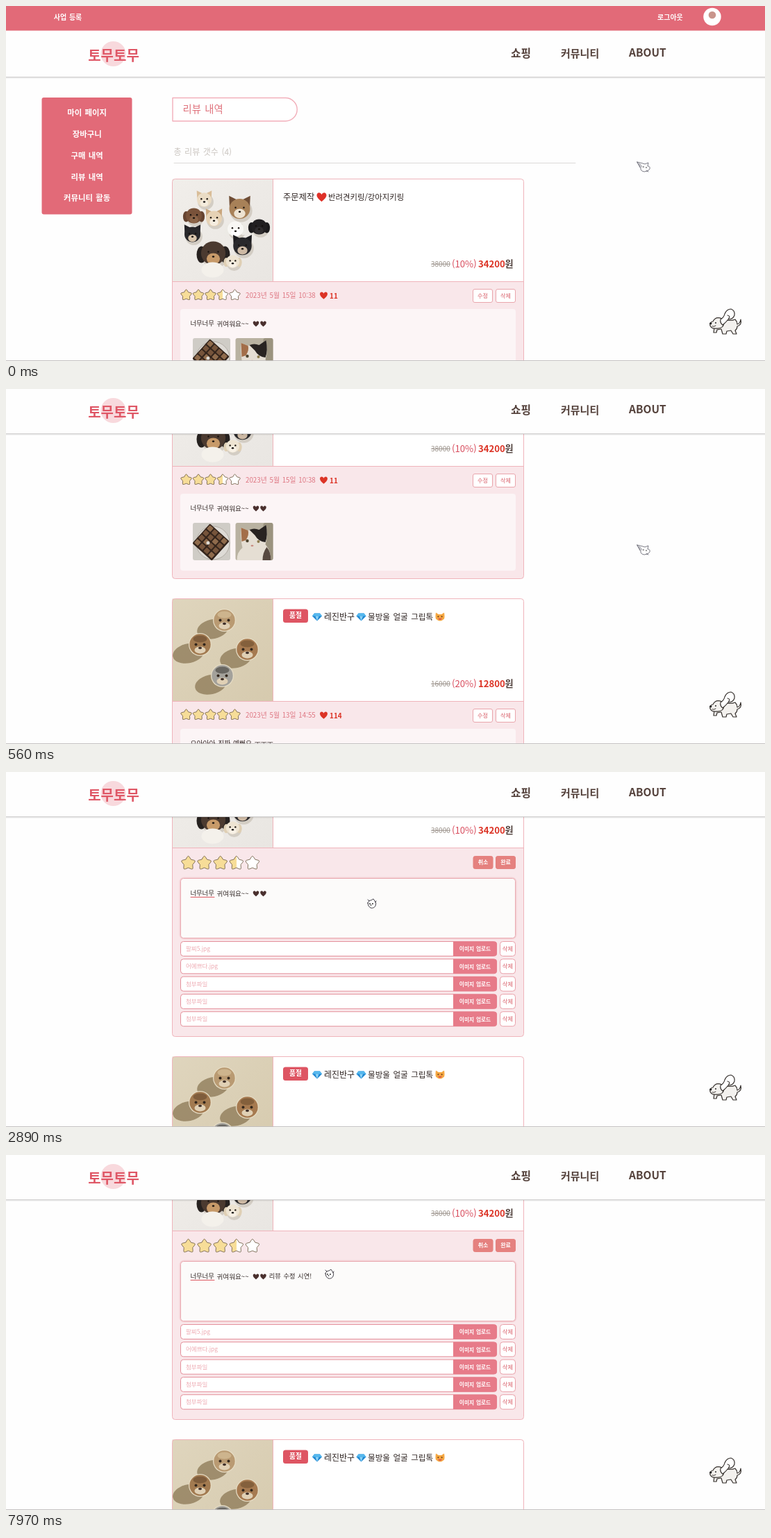
Animation, 1093 px wide and 512 px high, one loop 8000 ms. Source, as an HTML page:

```html
<!DOCTYPE html>
<html lang="ko">
<head>
<meta charset="utf-8">
<style>
  html, body { margin: 0; width: 100%; height: 100%; overflow: hidden; background: #fefefe; }
  svg { display: block; }
  text { font-family: 'Noto Sans CJK KR', 'Noto Sans CJK JP', 'Noto Sans CJK', sans-serif; white-space: pre; word-spacing: .1em; }
</style>
</head>
<body>
<svg id="stage" width="1093" height="512" viewBox="0 0 1093 512"></svg>
<script>
const LOOP = 8000, SCROLL = 288, EDIT_AT = 1630, EDIT_GROWTH = 110;
const ROSE = '#e26a78', LINE = '#efb4bb', INK = '#302624';

// Shape helpers
const label = (x, y, str, size, fill, weight = 400, extra = '') =>
  `<text x="${x}" y="${y + size * .37}" font-size="${size}" fill="${fill}" font-weight="${weight}" ${extra}>${str}</text>`;
const centered = (x, y, str, size, fill, weight) => label(x, y, str, size, fill, weight, 'text-anchor="middle"');
const box = (x, y, w, h, r, fill, stroke = 'none', extra = '') =>
  `<rect x="${x}" y="${y}" width="${w}" height="${h}" rx="${r}" fill="${fill}" stroke="${stroke}" ${extra}/>`;
const disc = (x, y, r, fill, ry = r) => `<ellipse cx="${x}" cy="${y}" rx="${r}" ry="${ry}" fill="${fill}"/>`;
const path = (d, fill, stroke = 'none', width = 1) =>
  `<path d="${d}" fill="${fill}" stroke="${stroke}" stroke-width="${width}" stroke-linejoin="round" stroke-linecap="round"/>`;
const group = (x, y, content, extra = '') => `<g transform="translate(${x} ${y})" ${extra}>${content}</g>`;
const button = (x, y, w, h, str, size, fill, stroke, ink, weight = 400) =>
  box(x, y, w, h, 2.5, fill, stroke) + centered(x + w / 2, y + h / 2, str, size, ink, weight);

const heart = (x, y, s, fill) => group(x, y,
  `<path transform="scale(${s / 2})" d="M0 .95C-.5.55-1 .1-1-.35-1-1-.25-1.1 0-.5.25-1.1 1-1 1-.35 1 .1.5.55 0 .95Z" fill="${fill}"/>`);

// Star with rounded tips
function star(x, y, r, amount) {
  const polar = (step, d) => [x + d * Math.sin(step * Math.PI / 5), y - d * Math.cos(step * Math.PI / 5)];
  const between = (a, b, p) => a.map((v, i) => v + (b[i] - v) * p);
  const arms = [0, 2, 4, 6, 8].map(i => {
    const left = polar(i - 1, r * .63), tip = polar(i, r * 1.1), right = polar(i + 1, r * .63);
    return `${between(left, tip, .6)}Q${tip} ${between(tip, right, .4)}L${right}`;
  });
  const fill = amount >= 1 ? '#f7dd98' : amount > 0 ? 'url(#half)' : '#fff';
  return path(`M${arms.join('L')}Z`, fill, '#77664e', .9);
}
const stars = (x, y, r, gap, score) => [0, 1, 2, 3, 4].map(i => star(x + i * gap, y, r, score - i)).join('');

const gem = (x, y) => group(x, y,
  path('M-7-1L-4-5H4L7-1L0 6Z', '#1f87d2') + path('M-7-1H7L4-5H-4Z', '#55b8ee') + path('M-2.5-1H2.5L0 6Z', '#8ad2f6'));
const catFace = (x, y) => group(x, y,
  path('M-6-6L-2-3.5H2L6-6Q7 0 6 3Q3 6 0 6T-6 3Q-7 0-6-6Z', '#f5a742') +
  disc(-2.6, -.3, 1, '#6b3c14') + disc(2.6, -.3, 1, '#6b3c14') + path('M-3 2.3H3Q1.5 4.5 0 4.5T-3 2.3Z', '#d9534f'));

// Pictures as flat shapes
function feltHead([x, y, r, coat, muzzle, ears, floppy]) {
  const earShapes = floppy
    ? disc(-r * .85, r * .1, r * .35, ears, r * .6) + disc(r * .85, r * .1, r * .35, ears, r * .6)
    : path(`M${-r * .9} ${-r * 1.1}L${-r * .1} ${-r * .7}L${-r * .85} 0ZM${r * .9} ${-r * 1.1}L${r * .1} ${-r * .7}L${r * .85} 0Z`, ears);
  return group(x, y, disc(2, 3, r * .95, '#d3cdc4') + earShapes +
    disc(0, 0, r * .88, coat, r * .85) + disc(0, r * .4, r * .48, muzzle, r * .4) +
    disc(-r * .35, -r * .1, 1.2, '#17120f') + disc(r * .35, -r * .1, 1.2, '#17120f') + disc(0, r * .25, 1.7, '#17120f', 1.3));
}
const keyringPhoto = box(0, 0, 145, 148, 0, 'url(#paper)') + [
  [46, 30, 12, '#eadcc5', '#f4ecdd', '#d9bd98'], [97, 43, 17, '#a88158', '#eee3d2', '#6f4d35'],
  [31, 53, 13, '#79523a', '#8c6549', '#654330', true], [60, 57, 13, '#e6d2b5', '#f5ecdf', '#c9a67d'],
  [125, 69, 13, '#211f21', '#302d2f', '#1b1a1c', true], [91, 72, 13, '#f8f7f4', '#fff', '#eceae5', true],
  [29, 80, 13, '#29282b', '#d8c5ad', '#242327'], [101, 97, 15, '#29282b', '#cdb9a4', '#1d1c1f'],
  [59, 107, 20, '#4b3a30', '#c79a69', '#26211f', true], [87, 119, 11, '#eee4d2', '#f8f1e6', '#dfcfb4', true]
].map(feltHead).join('') + disc(58, 131, 16, '#f4f1eb', 11);

function gripToy([x, y, coat, shade]) {
  return group(x, y,
    `<ellipse cx="-19" cy="9" rx="23" ry="14" transform="rotate(-12)" fill="#8b7754" opacity=".75"/>` +
    disc(0, 0, 16.5, '#e6dcc4') + disc(0, 0, 15.2, coat) + disc(0, 8, 8, '#e0d0b5', 5) + disc(0, -8, 10, shade, 5) +
    disc(-6, 0, 2, '#33271d') + disc(6, 0, 2, '#33271d') + disc(0, 5, 2.5, '#40302a', 1.8));
}
const gripPhoto = box(0, 0, 145, 148, 0, 'url(#sand)') + `<g clip-path="url(#photoClip)">` + [
  [75, 31, '#b99a72', '#cdb48d'], [40, 66, '#a27a50', '#7f5d3c'],
  [108, 73, '#a67a50', '#84603c'], [72, 111, '#a3a19b', '#686661']
].map(gripToy).join('') + '</g>';

const chocolateCells = Array.from({ length: 16 }, (_, i) =>
  box(i % 4 * 9 - 17.5, (i >> 2) * 9 - 17.5, 7, 7, 1, i % 3 ? '#76543b' : '#8f6b4c')).join('');
const chocolateThumb = box(0, 0, 54, 54, 3, '#cfccc6') +
  `<circle cx="29" cy="29" r="24" fill="#dedbd6" stroke="#a9a39b" stroke-width=".8"/>` +
  `<g transform="translate(26 28) rotate(42)">${box(-19, -19, 38, 38, 2, '#35251c')}${chocolateCells}</g>` + disc(22, 29, 2.5, '#dedbd5');
const catThumb = box(0, 0, 54, 54, 3, '#b9b2a1') + box(40, 0, 14, 54, 3, '#9b937f') +
  path('M2 54Q2 42 10 36Q7 24 8 7L18 11Q26 7 34 10L44 3Q47 20 43 31Q51 40 51 54Z', '#e5ded3') +
  path('M8 7L18 11Q20 17 15 25L9 27Z', '#a36e49') + path('M20 10Q27 7 34 10L44 3Q47 18 43 28Q33 27 28 18Z', '#282321') +
  path('M39 54Q39 43 45 35Q51 42 51 54Z', '#574940') +
  disc(17, 26, 2.2, '#4e4530') + disc(33, 27, 2, '#8c7b4b') + disc(24, 33, 2, '#c98f84', 1.3);

// Review card, in coordinates relative to its corner
const filledButton = (x, str, fill = '#e5817f') => button(x, 160, 28, 18, str, 8, fill, fill, '#fff', 700);
const outlinedButton = (x, str) => button(x, 159, 28, 19, str, 8.2, '#fff', '#e9a5ac', '#d9626c');

function viewPanel({ score, date, likes, review, thumbs = '' }) {
  return stars(20, 167.5, 8.3, 17.5, score) + label(105.5, 168, date, 9.8, '#de7580') +
    heart(218, 168, 11, '#dc3426') + label(226.5, 168.5, likes, 10, '#dc3426', 700) +
    outlinedButton(433, '수정') + outlinedButton(466, '삭제') +
    box(11.5, 187.5, 483, 111, 4, '#fcf5f6') + review + thumbs;
}
const cardFrame = ({ photo, title, was, off, price }) =>
  box(0, 0, 506, 146, 4, '#fff') + box(0, 6, 506, 142, 0, '#fff') + photo + title +
  label(372.5, 123, was, 10, '#999088', 400, 'text-decoration="line-through"') +
  label(402.5, 123, off, 13.2, '#d84b5c') + label(440.5, 123, price, 13.2, '#dc3426', 700) +
  label(479, 123, '원', 13.2, '#50403c', 700) + path('M145 0V148M0 148H506', 'none', LINE);

const reviewText = y => label(26, y, '너무너무', 9.3, INK) + label(64, y, '귀여워요~~', 9.6, INK) +
  heart(120.5, y + .3, 8.6, '#4a302e') + heart(131, y + .3, 8.6, '#4a302e');

const files = ['팔찌5.jpg', '어예쁘다.jpg', '첨부파일', '첨부파일', '첨부파일'];
const fileRow = (name, i) => group(0, 283 + i * 25.3,
  box(12, 0, 455, 21, 4, '#fff', '#e4909b') + label(19.5, 10.5, name, 8.5, '#eeabb3') +
  path('M404.5 0H463.5Q467.5 0 467.5 4V17Q467.5 21 463.5 21H404.5Z', '#e77b89') +
  centered(436, 11, '이미지 업로드', 7.7, '#fff', 700) +
  box(472, 0, 22, 21, 4, '#fff', '#e9a0a9') + centered(483, 10.5, '삭제', 8.4, '#d9626c'));

const editPanel = stars(23, 170, 10.5, 23.1, 3.5) + filledButton(433.5, '취소') + filledButton(466, '완료') +
  `<g class="hover">${filledButton(433.5, '취소', '#df686f')}</g>` +
  `<g id="focus">${box(12, 192, 482, 86, 5, 'none', '#eeb3ba', 'stroke-width="4" opacity=".4"')}</g>` +
  box(12, 192, 482, 86, 4, '#fcfbfa', '#e9a9b0') + reviewText(213.5) +
  `<g id="spelling">${path('M26.5 219H60.5', 'none', '#dd5a62', 1)}</g>` +
  label(139.3, 213.5, '', 9.3, INK, 400, 'id="typed"') + box(0, 206.5, 1, 14, 0, '#333', 'none', 'id="caret"') +
  files.map(fileRow).join('');

const cardShell = (id, content) =>
  box(0, 0, 506, 310, 4, '#f9e7ea', 'none', `id="${id}Back"`) + content +
  box(0, 0, 506, 310, 4, 'none', LINE, `id="${id}Edge"`);

const firstCard = cardShell('first', cardFrame({
  photo: keyringPhoto, was: '38000', off: '(10%)', price: '34200',
  title: label(159.5, 26, '주문제작', 12.3, INK) + heart(215, 26, 14, '#df3128') + label(224.5, 26, '반려견키링/강아지키링', 11.4, INK)
}) + `<g id="view">${viewPanel({
  score: 3.5, date: '2023년 5월 15일 10:38', likes: '11', review: reviewText(208.5),
  thumbs: group(29.5, 229.5, chocolateThumb) + group(91, 229.5, catThumb)
})}<g class="hover">${filledButton(433.5, '수정', '#df686f')}</g></g><g id="edit">${editPanel}</g>`);

const secondCard = cardShell('second', cardFrame({
  photo: gripPhoto, was: '16000', off: '(20%)', price: '12800',
  title: box(159.5, 15, 36, 19.5, 3.5, '#de5563') + centered(177.5, 24, '품절', 9.8, '#fff', 700) +
    gem(208.5, 26) + label(218.5, 26, '레진반구', 12, INK) + gem(272, 26) +
    label(281.5, 26, '물방울 얼굴 그립톡', 11.6, INK) + catFace(385.5, 26)
}) + viewPanel({
  score: 5, date: '2023년 5월 13일 14:55', likes: '114',
  review: label(26, 208.5, '으아아아 진짜 예뻐요 ㅜㅜㅜ', 9.8, INK)
}));

const menu = ['마이 페이지', '장바구니', '구매 내역', '리뷰 내역', '커뮤니티 활동'];
const page = box(51.5, 132, 130, 168.5, 3, ROSE) +
  menu.map((item, i) => centered(116.7, 154 + i * 30.8, item, 11.4, '#fff', 700)).join('') +
  path('M240 132.5H402.5A16.7 16.7 0 0 1 402.5 166H240Z', '#fff', '#f2afba', 1.4) +
  label(254.5, 149, '리뷰 내역', 14.3, '#df717b') +
  label(241.5, 210.5, '총 리뷰 갯수 (4)', 12, '#cbc6c1') + path('M242 226.5H820', 'none', '#dcdad8') +
  group(239.5, 249.5, firstCard) + group(239.5, 588.5, secondCard, 'id="second"');

const header = box(0, 35, 1093, 69.5, 0, '#000', 'none', 'opacity=".08"') + box(0, 35, 1093, 67, 0, '#fefefe') +
  path('M0 102.5H1093', 'none', '#cfcdcd') + box(0, 0, 1093, 35.5, 0, ROSE) +
  label(68.7, 16, '사업 등록', 10, '#fff', 700) + label(938, 16, '로그아웃', 10, '#fff', 700) +
  disc(1017, 15.5, 12.7, '#fff') + disc(1017, 13, 5.3, '#c9958c') +
  disc(154.5, 69, 18, '#f8d9dd') + centered(155, 72, '토무토무', 20, '#df5766', 900) +
  label(727, 68.5, '쇼핑', 15.8, '#54413b', 700) + label(799, 68, '커뮤니티', 15, '#54413b', 700) +
  label(897, 67.5, 'ABOUT', 15.5, '#54413b', 700);

const walkingDog =
  path('M1032 452Q1044 455 1050 452Q1053 455 1053 459Q1057 458 1058 452Q1060 460 1053 462Q1053 466 1050 468L1052 473H1047L1044 468L1038 469L1037 473H1032L1030 466L1024 467L1023 471H1019L1020 464Z', '#f3f1ee', '#37322f', 1.2) +
  path('M1031 451Q1022 447 1018 455Q1013 456 1014 461Q1016 466 1023 465Q1033 466 1034 457Z', '#f3f1ee', '#37322f', 1.2) +
  path('M1029 452Q1034 449 1035 444Q1038 437 1044 437Q1050 439 1049 446Q1047 452 1040 452Q1036 457 1032 460Q1028 457 1029 452ZM1040 452Q1044 447 1039 446', '#fff', '#37322f', 1.2) +
  disc(1022, 457, 1, '#222') + disc(1014.8, 458, 1.7, '#222', 1.4) + path('M1017 462Q1020 463 1022 461', 'none', '#37322f');

const cursors = {
  arrow: path('M-9-7L-1-5L2-4L7-6L6-1Q10-1 9 3Q7 7 1 7Q-5 6-4 1Z', '#fff', '#5b5b68', .8) +
    path('M-9-7L-5 1M-6-5L-2 0M7 7L4 5', 'none', '#5b5b68', .8) + disc(0, 0, .8, '#222') + disc(4, 1, .8, '#222'),
  hand: path('M-2-6Q0-7 1-5V-1Q5-2 5 2Q5 7 1 7Q-3 7-4 3L-6 0Q-5-2-2 0Z', '#fff', '#55474a', .9) + path('M1 0V3M3 0V3', 'none', '#55474a', .7),
  face: path('M-6-1Q-5-5-1-5L2-7L4-4Q7-1 5 3Q3 7-2 6Q-6 4-6-1Z', '#fff', '#45424a', 1) +
    path('M-4-4L-6-6M5-2L6-4', 'none', '#45424a', 1) + disc(-3, 0, .9, '#222') + disc(1, 0, .9, '#222') + disc(-1.5, 2, 1, '#222', .7)
};

const stage = document.getElementById('stage');
stage.innerHTML = `<defs>
  <linearGradient id="half"><stop offset=".5" stop-color="#f7dd98"/><stop offset=".5" stop-color="#fff"/></linearGradient>
  <linearGradient id="paper" x2="1" y2="1"><stop stop-color="#f1eeea"/><stop offset="1" stop-color="#e9e6e2"/></linearGradient>
  <linearGradient id="sand" x2="1" y2="1"><stop stop-color="#dfd5bd"/><stop offset="1" stop-color="#d6caae"/></linearGradient>
  <clipPath id="photoClip"><rect width="145" height="148"/></clipPath></defs>
  <g id="page">${page}</g><g id="header">${header}</g>${walkingDog}
  ${path('M0 511.5H1093', 'none', '#c4c2c2')}
  <g id="cursor">${Object.entries(cursors).map(([kind, art]) => `<g id="${kind}">${art}</g>`).join('')}</g>`;

// [time, text after the hearts, caret visible]
const typing = [
  [0, '', false], [2360, '', true], [2890, '', false], [3090, '', true],
  [3420, 'ㄹ', true], [3550, '리', true], [3750, '립', true], [3820, '리뷰', true],
  [4040, '리뷰 ㅅ', true], [4300, '리뷰 수ㅈ', true], [4700, '리뷰 수', true], [4830, '리뷰 ', true], [5240, '리뷰 ', false],
  [5710, '리뷰 ㅅ', true], [5800, '리뷰 수', true], [5880, '리뷰 숮', true], [5970, '리뷰 수저', true],
  [6110, '리뷰 수정', true], [6220, '리뷰 수정 ', true], [6330, '리뷰 수정 ㅅ', true], [6440, '리뷰 수정 시', true],
  [6580, '리뷰 수정 싱', true], [6670, '리뷰 수정 시여', true], [6770, '리뷰 수정 시연', true],
  [7170, '리뷰 수정 시연!', true], [7700, '리뷰 수정 시연!', false]
];
// [start, end, x, y]
const moves = [[620, 1040, 662, 137], [1040, 1490, 687, 130], [1700, 2090, 527, 190], [7970, 7970, 466, 172]];

const $ = id => document.getElementById(id);
const show = (el, on) => { el.style.display = on ? '' : 'none'; };
const ease = (t, from, to) => {
  if (t >= to) return 1;
  const p = Math.max(0, (t - from) / (to - from));
  return p * p * (3 - 2 * p);
};

function render(t) {
  // Scroll and pointer advance in 70 ms ticks, as a screen capture does
  const tick = t < 270 ? 0 : t < 1490 ? 270 + Math.floor((t - 270) / 70) * 70 : t;
  const scroll = Math.floor(SCROLL * ease(tick, 180, 566));
  const editing = t >= EDIT_AT;
  const growth = editing ? EDIT_GROWTH : 0;

  $('page').setAttribute('transform', `translate(0 ${-scroll})`);
  $('header').setAttribute('transform', `translate(0 ${-Math.min(38, scroll)})`);
  $('second').setAttribute('transform', `translate(239.5 ${588.5 + growth})`);
  for (const id of ['firstBack', 'firstEdge']) $(id).setAttribute('height', 310 + growth);
  show($('view'), !editing);
  show($('edit'), editing);
  show($('focus'), t >= 2090);
  show($('spelling'), t >= 2360);

  const [, text, caretOn] = typing.findLast(([time]) => t >= time);
  if ($('typed').textContent !== text) $('typed').textContent = text;
  const caretX = t < 3090 ? 135.5 : 138.5 + (text ? $('typed').getComputedTextLength() : 0);
  $('caret').setAttribute('x', caretX);
  show($('caret'), caretOn);

  let x = 918, y = 232;
  for (const [from, to, toX, toY] of moves) {
    const p = ease(tick, from, to);
    x += (toX - x) * p;
    y += (toY - y) * p;
  }
  const overButton = scroll === SCROLL && x > 673 && x < 702 && y > 120 && y < 141;
  const kind = overButton ? 'hand' : editing && y > 153 ? 'face' : 'arrow';
  $('cursor').setAttribute('transform', `translate(${x} ${y})`);
  for (const name in cursors) show($(name), name === kind);
  document.querySelectorAll('.hover').forEach(el => show(el, overButton));
}

const start = performance.now();
function frame() {
  render((performance.now() - start) % LOOP);
  requestAnimationFrame(frame);
}
frame();
</script>
</body>
</html>
```
